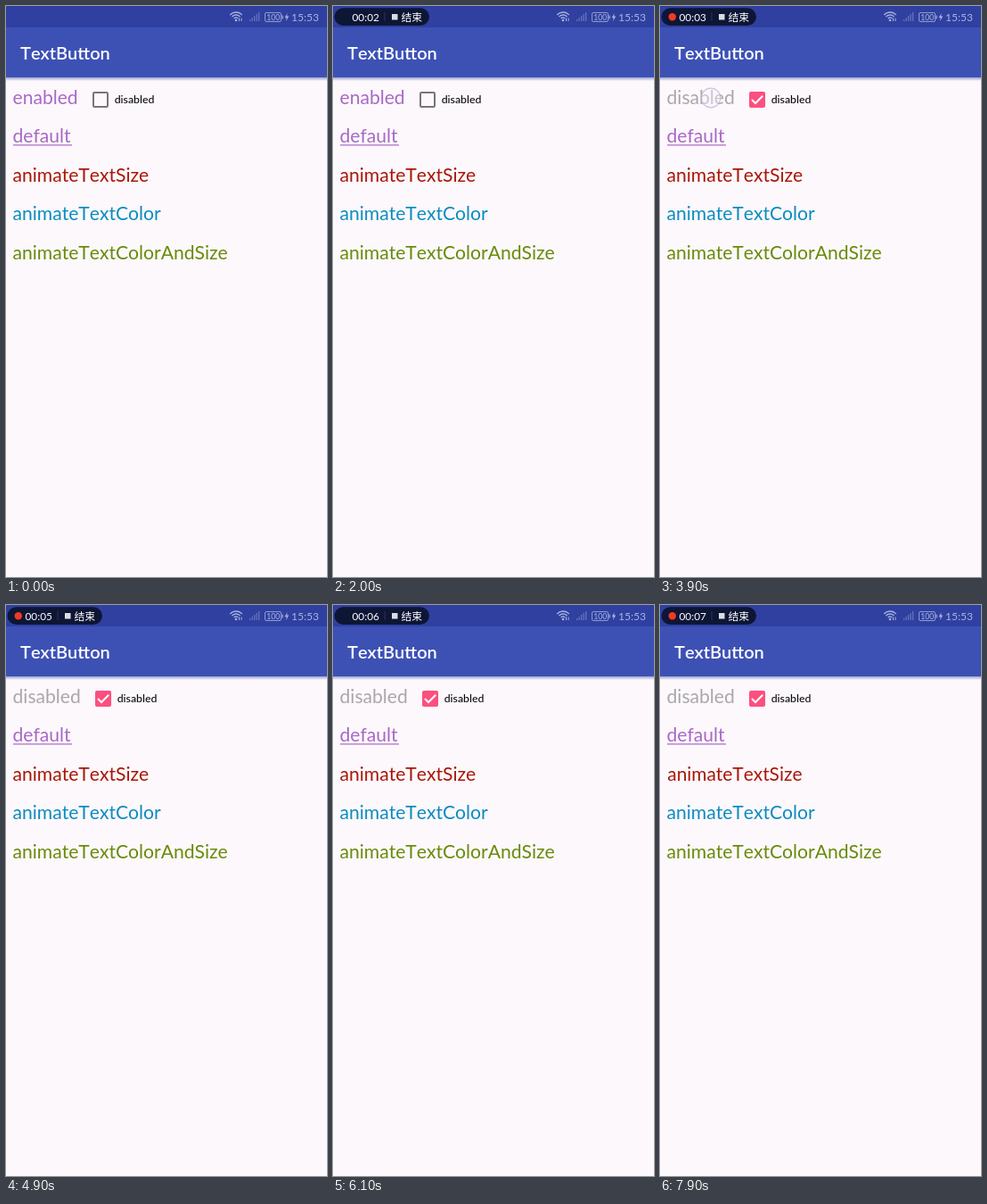
These frames come from a looping animation (360 by 640 pixels, 8 s). An HTML page with a canvas:

```html
<!DOCTYPE html>
<html lang="en">
<head>
<meta charset="utf-8">
<title>TextButton</title>
<style>
  html, body { margin: 0; width: 100%; height: 100%; overflow: hidden; background: #fcf8fb; }
  canvas { display: block; width: 360px; height: 640px; }
</style>
</head>
<body>
<canvas id="stage"></canvas>
<script>
const LOOP = 8000;
const W = 360, H = 640;
const FONT = 'Lato, "Open Sans", sans-serif';
const CJK = '"Noto Sans CJK SC", "Noto Sans CJK", sans-serif';
const PAPER = '#fcf8fb', PURPLE = '#a968c8', GREY = '#aaa7ac', PINK = '#fd4f7f';
const TOGGLE = 2700;            // moment the checkbox is switched
const TICKS = [900, 1900, 2900, 3950, 4900, 5950, 6950];
const TAPS = [
  { x: 51, y: 104.5, from: 1120, to: 1600 },
  { x: 109, y: 106, from: 2450, to: 3150 },
  { x: 57, y: 103, from: 3720, to: 4300 },
  { x: 43, y: 148, from: 5350, to: 6050 },
  { x: 82, y: 191, from: 7150, to: 7750 }
];

const canvas = document.getElementById('stage');
const c = canvas.getContext('2d');
const dpr = window.devicePixelRatio || 1;
canvas.width = W * dpr;
canvas.height = H * dpr;
c.fontKerning = 'none';

const clamp = v => Math.max(0, Math.min(1, v));
const ramp = (t, a, b) => clamp((t - a) / (b - a));
const ease = v => v * v * (3 - 2 * v);
// rises from a to b, falls from d to e
const pulse = (t, a, b, d, e) => ease(ramp(t, a, b)) * (1 - ease(ramp(t, d, e)));

function text(str, x, y, size, color, weight = 400, family = FONT) {
  c.font = `${weight} ${size}px ${family}`;
  c.fillStyle = color;
  c.fillText(str, x, y);
}

function rect(x, y, w, h, color) {
  c.fillStyle = color;
  c.fillRect(x, y, w, h);
}

function round(x, y, w, h, r) {
  c.beginPath();
  c.moveTo(x + r, y);
  c.arcTo(x + w, y, x + w, y + h, r);
  c.arcTo(x + w, y + h, x, y + h, r);
  c.arcTo(x, y + h, x, y, r);
  c.arcTo(x, y, x + w, y, r);
  c.closePath();
}

function line(points, color, width) {
  c.beginPath();
  points.forEach(([x, y], i) => i ? c.lineTo(x, y) : c.moveTo(x, y));
  c.strokeStyle = color;
  c.lineWidth = width;
  c.stroke();
}

function statusIcons() {
  const ink = '#a9b3de';
  c.strokeStyle = ink;
  c.lineWidth = 1.3;
  for (const r of [3, 6, 9]) {
    c.beginPath();
    c.arc(258, 16, r, -Math.PI * 0.77, -Math.PI * 0.23);
    c.stroke();
  }
  c.beginPath();
  c.arc(258, 16, 1.3, 0, Math.PI * 2);
  c.fillStyle = ink;
  c.fill();
  line([[261.5, 17], [261.5, 13.5]], ink, 1);
  line([[264, 13.5], [264, 17]], ink, 1);

  for (let i = 0; i < 5; i++) {
    const h = 2 + i * 2;
    rect(273 + i * 2.5, 17 - h, 1.3, h, '#6572ba');
  }

  round(290.5, 7.5, 18, 10, 1.5);
  c.strokeStyle = '#8f9bd0';
  c.lineWidth = 1;
  c.stroke();
  rect(309.5, 10.5, 1.2, 4, ink);
  text('100', 292.2, 15.8, 8.6, ink);

  c.beginPath();
  c.moveTo(315.6, 8);
  c.lineTo(312.6, 13.2);
  c.lineTo(314.7, 13.2);
  c.lineTo(314, 17.2);
  c.lineTo(317.2, 11.6);
  c.lineTo(315.1, 11.6);
  c.closePath();
  c.fillStyle = ink;
  c.fill();
  text('15:53', 320, 17, 12, ink);
}

function recorder(t) {
  if (t < 100) return;
  const sec = TICKS.filter(k => t >= k).length;
  round(1.5, 2.3, 106.5, 19.6, 9.8);
  c.fillStyle = '#0e1636';
  c.fill();
  if (t % 1000 >= 500) {
    c.beginPath();
    c.arc(13.8, 12.2, 4.2, 0, Math.PI * 2);
    c.fillStyle = '#f23a22';
    c.fill();
  }
  text('00:0' + sec, 21.5, 16.5, 11.8, '#fff');
  rect(57.5, 7, 1, 10, '#2c3354');
  rect(66, 9, 6.5, 6.5, '#dcdce2');
  text('结束', 76.5, 16.6, 11.8, '#fff', 400, CJK);
}

function header(t) {
  rect(0, 0, W, 24, '#2f40a0');
  rect(0, 24, W, 56, '#3d51b5');
  const g = c.createLinearGradient(0, 80, 0, 84);
  g.addColorStop(0, 'rgba(60,75,165,.5)');
  g.addColorStop(1, 'rgba(60,75,165,0)');
  rect(0, 80, W, 4, g);
  statusIcons();
  recorder(t);
  text('TextButton', 16, 59.7, 20, '#fff', 600);
}

function checkbox(t, x) {
  const y = 96;
  const tint = ramp(t, TOGGLE - 50, TOGGLE + 150);
  const fill = ease(ramp(t, TOGGLE + 80, TOGGLE + 280));
  const mark = ease(ramp(t, TOGGLE + 260, TOGGLE + 480));
  const inset = 1 + fill * 3.5;
  round(x + inset, y + inset, 18 - inset * 2, 18 - inset * 2, 1.2);
  c.lineWidth = inset * 2;
  c.strokeStyle = '#77757a';
  c.stroke();
  if (tint) {
    c.globalAlpha = tint;
    c.strokeStyle = PINK;
    c.stroke();
    c.globalAlpha = 1;
  }
  if (fill === 1) {
    round(x, y, 18, 18, 2);
    c.fillStyle = PINK;
    c.fill();
  }
  if (mark) {
    const a = [x + 3, y + 9], b = [x + 7, y + 13], d = [x + 15.2, y + 4.8];
    const mix = (p, k) => [b[0] + (p[0] - b[0]) * k, b[1] + (p[1] - b[1]) * k];
    line([mix(a, mark), b, mix(d, mark)], '#fff', 2);
  }
}

function buttons(t) {
  const off = t >= TOGGLE;
  const size = 21.1;

  c.globalAlpha = 1 - 0.4 * pulse(t, 1220, 1320, 1450, 1600);
  text(off ? 'disabled' : 'enabled', 7.5, 109.8, size, off ? GREY : PURPLE);
  c.globalAlpha = 1;

  const x = off ? 100 : 97;
  checkbox(t, x);
  text('disabled', x + 24.7, 109.3, 12.3, '#0c0a0e', 500);

  c.globalAlpha = 1 - 0.4 * pulse(t, 5400, 5550, 5850, 6080);
  text('default', 7.5, 153.2, size, PURPLE);
  rect(8, 155.3, 66, 1.2, PURPLE);
  c.globalAlpha = 1;

  const scale = 1 - 0.18 * pulse(t, 7200, 7450, 7600, 7950);
  c.save();
  c.translate(83.5, 190);
  c.scale(scale, scale);
  text('animateTextSize', -76, 6.8, size, '#a91608');
  c.restore();

  text('animateTextColor', 7.5, 240.3, size, '#0a8cc0');
  text('animateTextColorAndSize', 7.5, 283.8, size, '#688b0a');
}

function touch(t) {
  for (const p of TAPS) {
    const a = pulse(t, p.from, p.from + 140, p.to - 200, p.to);
    if (!a) continue;
    c.globalAlpha = a;
    c.beginPath();
    c.arc(p.x, p.y, 10.8, 0, Math.PI * 2);
    c.fillStyle = 'rgba(247,243,250,.42)';
    c.fill();
    c.strokeStyle = 'rgba(185,172,214,.7)';
    c.lineWidth = 1.2;
    c.stroke();
  }
  c.globalAlpha = 1;
}

function draw(now) {
  const t = now % LOOP;
  c.setTransform(dpr, 0, 0, dpr, 0, 0);
  rect(0, 0, W, H, PAPER);
  header(t);
  buttons(t);
  touch(t);
}

let start;
function frame(now) {
  if (start === undefined) start = now;
  draw(now - start);
  requestAnimationFrame(frame);
}
draw(0);
requestAnimationFrame(frame);
</script>
</body>
</html>
```
